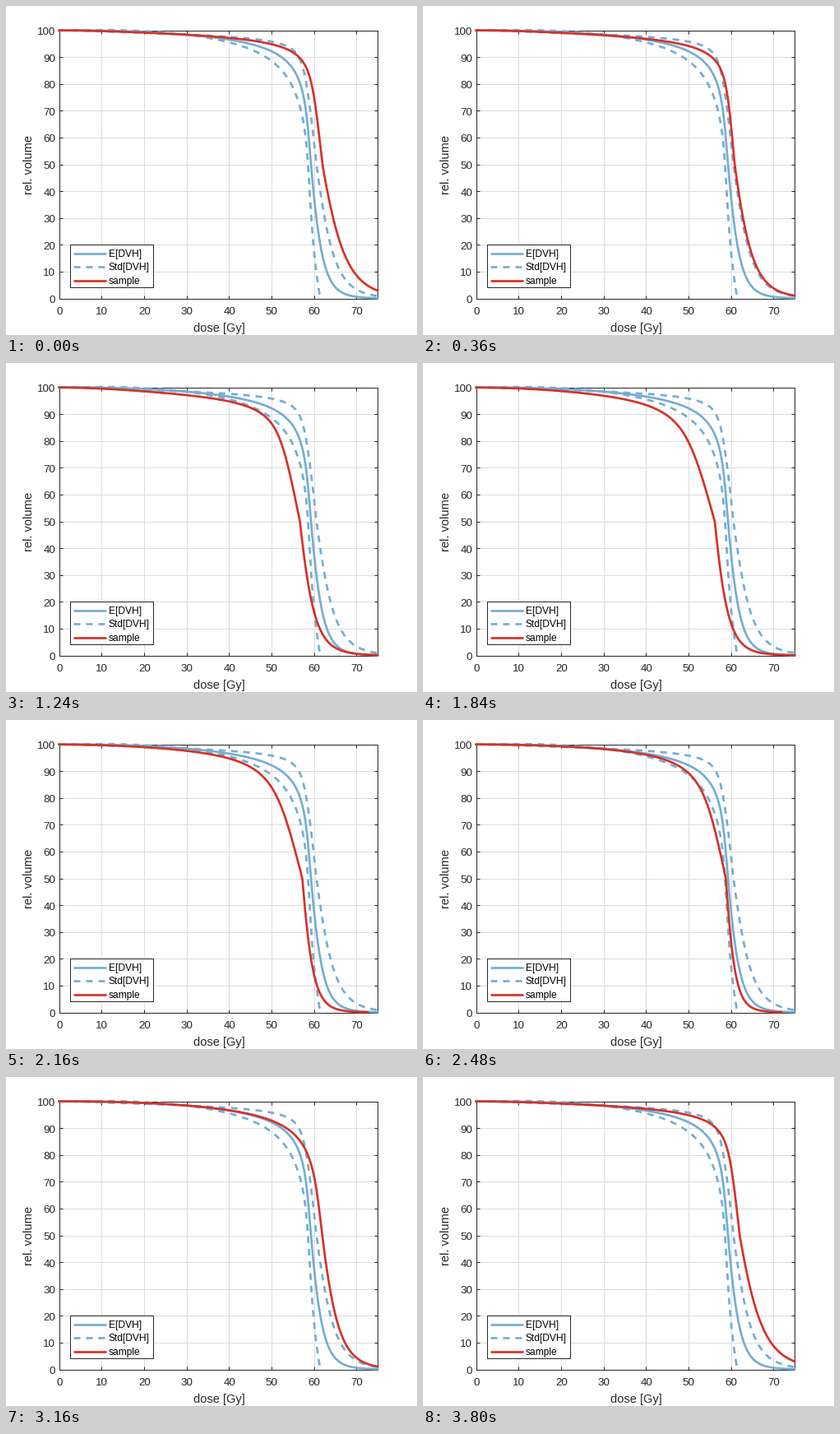
Write a matplotlib script that moves like this. It is 500 px wide and 400 px high and loops after 3840 ms.

```python
import matplotlib.pyplot as plt
import numpy as np
from matplotlib.animation import FuncAnimation
from matplotlib.patches import Rectangle

W, H, DPI = 500, 400, 100
PT = 72 / DPI                      # points per pixel
LEFT, RIGHT, TOP, BOTTOM = 64.6, 452.1, 29.6, 355.6
LOOP, STEP = 3840, 40
BLUE, RED, INK = "#74add1", "#d73027", "#262626"

plt.rcParams["font.family"] = "Liberation Sans"

# A curve is (half-volume dose, slope above it, shoulder place, shoulder
# sharpness, slope of the tail).
MEAN = (59.3, 1.25, 4.05, 3.8, 1.4)
UPPER = (60.6, 1.7, 4.1, 7.5, 2.1)
# The sample passes through these curves, by time in ms.
POSES = {
    0: (62, 1.75, 4.0, 5.5, 2.75),
    720: (59.3, 1.5, 3.75, 5, 1.5),
    1240: (56.7, 3.2, 3.57, 5.8, 1.75),
    1840: (56.2, 4.4, 3.58, 5, 1.6),
    2480: (58.8, 3.4, 4.2, 4.4, 1.1),
    3160: (61.95, 1.8, 4.02, 3.7, 2),
}
DOSE = np.linspace(0, 75, 600)


def volume(half, slope, shoulder, sharp, tail):
    """Relative volume over DOSE; the dose is a simple function of its logit."""
    z = np.linspace(10, -7, 800)
    up, down = np.maximum(z, 1e-9), np.maximum(-z, 0)
    plateau = half - 6 * slope - 5
    dose = (half - slope * up - plateau / (1 + (shoulder / up) ** sharp)
            + tail * down * (1 + 0.1 * down))
    return np.interp(DOSE, dose, 100 / (1 + np.exp(-z)), right=np.nan)


def sample_shape(t):
    """Periodic cubic through the poses."""
    times = np.array(list(POSES), float)
    knots = np.concatenate([times - LOOP, times, times + LOOP])
    values = np.tile(list(POSES.values()), (3, 1))
    slopes = np.gradient(values, knots, axis=0)
    i = np.searchsorted(knots, t, side="right") - 1
    h = knots[i + 1] - knots[i]
    s = (t - knots[i]) / h
    return ((1 + 2 * s) * (1 - s) ** 2 * values[i]
            + s * (1 - s) ** 2 * h * slopes[i]
            + s * s * (3 - 2 * s) * values[i + 1]
            + s * s * (s - 1) * h * slopes[i + 1])


fig = plt.figure(figsize=(W / DPI, H / DPI), dpi=DPI, facecolor="white")
ax = fig.add_axes([LEFT / W, 1 - BOTTOM / H, (RIGHT - LEFT) / W, (BOTTOM - TOP) / H])
ax.set(xticks=range(0, 75, 10), yticks=range(0, 110, 10), xlim=(0, 75), ylim=(0, 100))
ax.set_axisbelow(True)
ax.grid(color="#dcdcdc", lw=PT)
ax.tick_params(direction="in", length=4 * PT, width=PT, color=INK, top=True, right=True,
               labelbottom=False, labelleft=False)
for spine in ax.spines.values():
    spine.set(color=INK, linewidth=PT)


def label(x, y, text, size, **kw):
    fig.text(x / W, 1 - y / H, text, size=size * PT, color=INK, va="baseline", **kw)


for dose in range(0, 75, 10):
    label(65 + dose / 75 * (RIGHT - LEFT), 375, str(dose), 13.33, ha="center")
for vol in range(0, 110, 10):
    label(60, 361 - vol / 100 * (BOTTOM - TOP), str(vol), 13.33, ha="right")
label(259, 396, "dose [Gy]", 14.67, ha="center")
label(31.5, 193, "rel. volume", 14.67, ha="center", rotation=90, rotation_mode="anchor")

SOLID = dict(color=BLUE, lw=2.67 * PT)
DASHED = dict(SOLID, ls=(0, (3, 2.6)), dash_capstyle="butt")
SAMPLE = dict(color=RED, lw=2.67 * PT)


def plot(values, style):
    return ax.plot(DOSE, values, clip_on=False, zorder=3, **style)[0]


mean, upper = volume(*MEAN), volume(*UPPER)
lower = 2 * mean - upper
below = np.cumsum(lower < 0) > 0
plot(mean, SOLID)
plot(upper, DASHED)
plot(np.where(below, np.nan, lower), DASHED)
sample = plot(volume(*sample_shape(0)), SAMPLE)

# Legend, laid out in pixels
key = fig.add_axes([0, 0, 1, 1], xlim=(0, W), ylim=(H, 0))
key.axis("off")
key.add_patch(Rectangle((78, 290), 101, 52, fc="white", ec=INK, lw=PT))
for y, name, style in [(300.5, "E[DVH]", SOLID), (317, "Std[DVH]", DASHED),
                       (333.5, "sample", SAMPLE)]:
    key.plot([82, 121.5], [y, y], solid_capstyle="butt", **style)
    key.text(125, y + 4.5, name, size=12 * PT, color="black", va="baseline")


def draw(i):
    sample.set_ydata(volume(*sample_shape(i * STEP)))
    return sample,


anim = FuncAnimation(fig, draw, frames=LOOP // STEP, interval=STEP, repeat=True)
plt.show()
```
